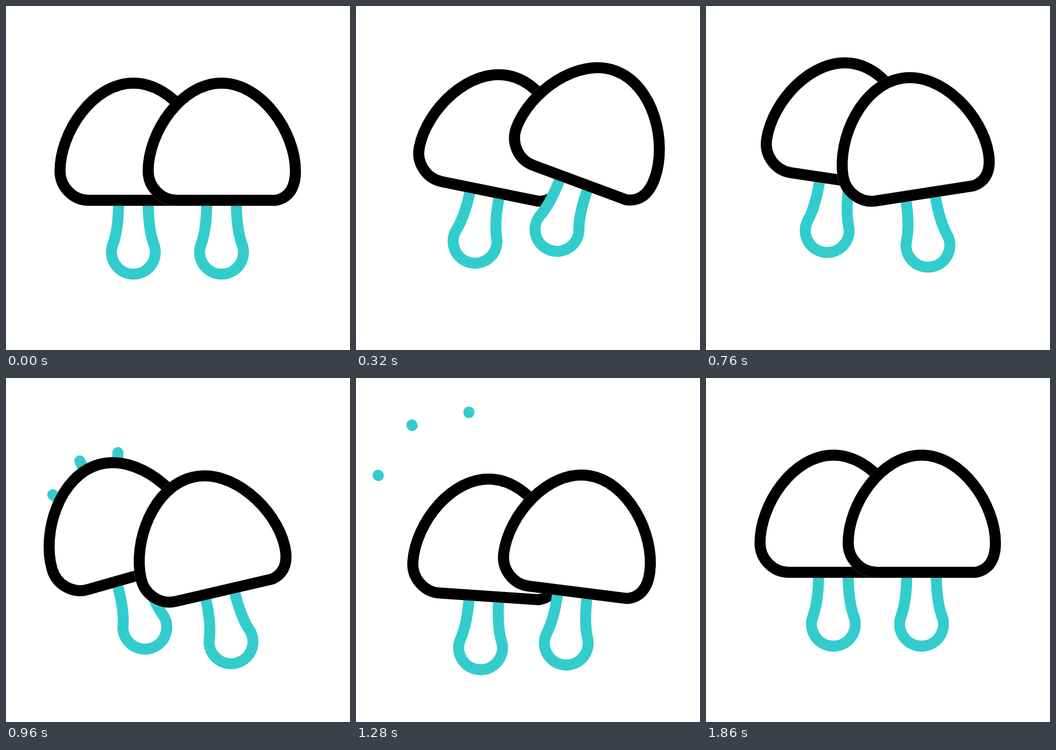
An HTML page with a canvas that plays this animation: 640x640 px, repeating every 2.4 s.

```html
<!DOCTYPE html>
<html lang="en">
<head>
<meta charset="utf-8">
<title>Bouncing mushrooms</title>
<style>
html, body { margin: 0; width: 100%; height: 100%; overflow: hidden; background: #fff; }
canvas { display: block; width: 100%; height: 100%; }
</style>
</head>
<body>
<canvas id="stage" width="640" height="640"></canvas>
<script>
const ctx = document.getElementById('stage').getContext('2d');
const LOOP = 2400, STEP = 20, LAG = 120, SHIFT = -164;
const TEAL = '#33cccc', LINE = 20.5;
const PIVOT = { x: 401, y: 380 };

const cap = new Path2D(
  'M318 361.5 H502 C523 357.5 538.5 342 538.5 307 ' +
  'C538.5 235 476 143.5 401 143.5 C326 143.5 264.5 235 264.5 307 ' +
  'C264.5 337 289 361.5 318 361.5 Z');
const stem = new Path2D(
  'M373.5 363 C373.5 395 370 424 363.1 443 ' +
  'A40.75 40.75 0 1 0 438.9 443 C432 424 428.5 395 428.5 363');

// Key poses as [time, value]: a damped swing in degrees, one hop in pixels
const swing = [[0, 0], [320, 20.3], [440, 25.8], [560, 17.7],
  [868, -16.5], [1255, 7.5], [1540, -4], [1740, 0]];
const hop = [[0, 0], [503, -53.5], [1080, 46], [1740, 0]];

// base and tip of each spore's flight
const spores = [
  [207.5, 170, 210, 63.4],
  [151, 182, 104, 87.5],
  [106, 232, 41, 181]
];

// Flat at turning points, smooth in between
function slope(keys, i) {
  if (i === 0 || i === keys.length - 1) return 0;
  const [[t0, v0], [t1, v1], [t2, v2]] = keys.slice(i - 1, i + 2);
  const a = t1 - t0, b = t2 - t1;
  const da = (v1 - v0) / a, db = (v2 - v1) / b;
  return da * db <= 0 ? 0 : (da * b + db * a) / (a + b);
}

function pose(keys, t) {
  if (t <= 0) return keys[0][1];
  const i = keys.findIndex(k => k[0] > t) - 1;
  if (i < 0) return keys[keys.length - 1][1];
  const [t0, v0] = keys[i], [t1, v1] = keys[i + 1];
  const d = t1 - t0, u = (t - t0) / d, w = 1 - u;
  return v0 * (1 + 2 * u) * w * w + v1 * u * u * (3 - 2 * u) +
    d * u * w * (slope(keys, i) * w - slope(keys, i + 1) * u);
}

function ease(t, from, to) {
  const u = Math.min(1, Math.max(0, (t - from) / (to - from)));
  return 0.5 - 0.5 * Math.cos(Math.PI * u);
}

function outline(path, color) {
  ctx.strokeStyle = color;
  ctx.stroke(path);
}

function mushroom(t, dx) {
  ctx.save();
  ctx.translate(PIVOT.x + dx, PIVOT.y + pose(hop, t));
  ctx.rotate(pose(swing, t) * Math.PI / 180);
  ctx.translate(-PIVOT.x, -PIVOT.y);
  ctx.fillStyle = '#fff';
  ctx.fill(stem);
  outline(stem, TEAL);
  ctx.fill(cap);
  outline(cap, '#fff');
  outline(cap, '#000');
  ctx.restore();
}

function drawSpores(t) {
  if (t < 860 || t >= 1300) return;
  const head = ease(t, 842, 1166), tail = ease(t, 1000, 1300);
  ctx.lineCap = 'round';
  ctx.strokeStyle = TEAL;
  for (const [x0, y0, x1, y1] of spores) {
    const dx = x1 - x0, dy = y1 - y0;
    ctx.beginPath();
    ctx.moveTo(x0 + dx * tail, y0 + dy * tail);
    ctx.lineTo(x0 + dx * head, y0 + dy * head);
    ctx.stroke();
  }
  ctx.lineCap = 'butt';
}

function draw(t) {
  ctx.fillStyle = '#fff';
  ctx.fillRect(0, 0, 640, 640);
  ctx.lineWidth = LINE;
  drawSpores(t);
  mushroom(t - LAG, SHIFT);
  mushroom(t, 0);
}

let start;
function tick(now) {
  if (start === undefined) start = now;
  const t = Math.max(0, now - start) % LOOP;
  draw(Math.floor(t / STEP) * STEP);
  requestAnimationFrame(tick);
}
draw(0);
requestAnimationFrame(tick);
</script>
</body>
</html>
```
